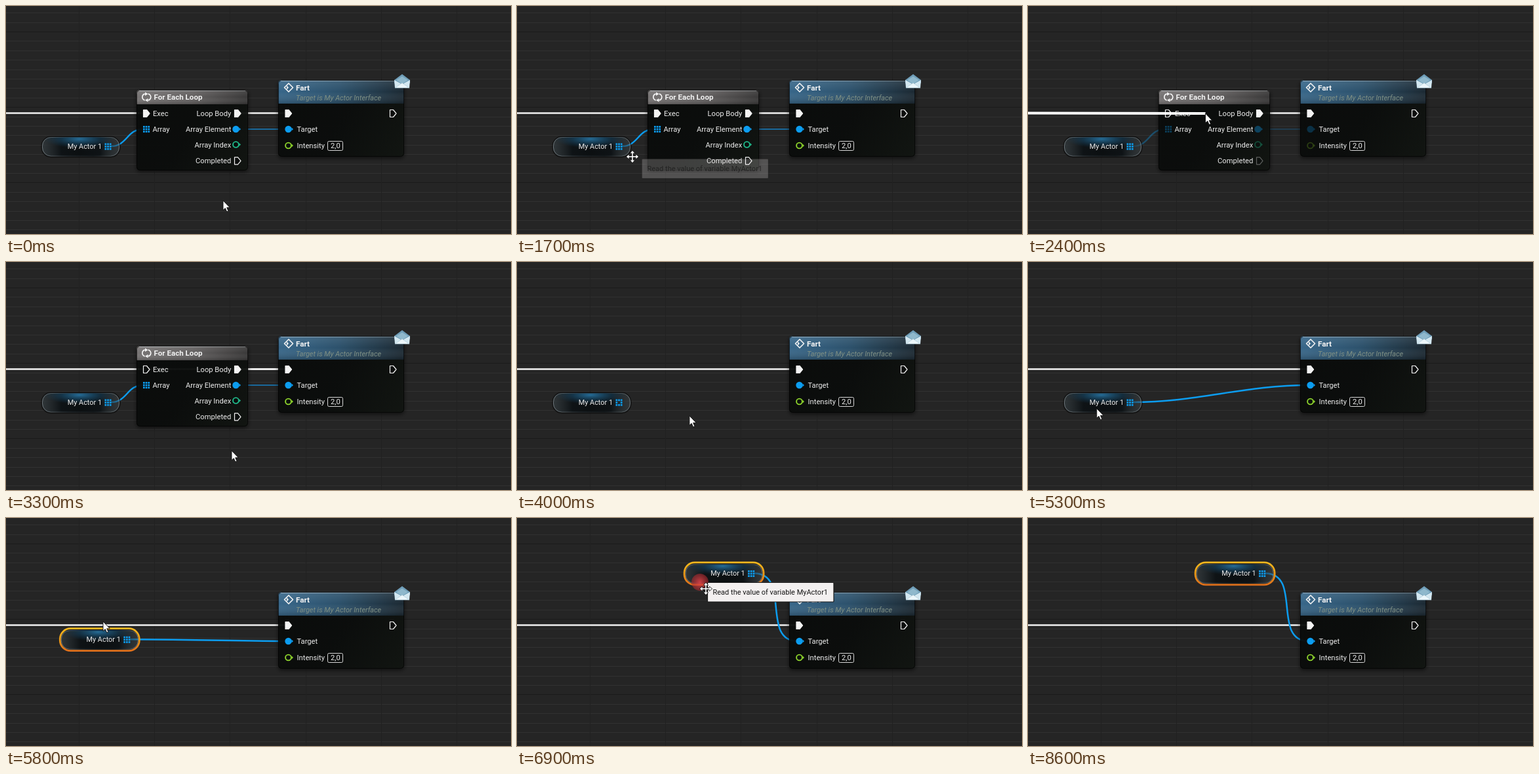
Recreate the animation shown at these times as an HTML page with a canvas. Size 770 px wide and 348 px high, loop 9.9 s.

```html
<!DOCTYPE html>
<html lang="en">
<head>
<meta charset="utf-8">
<title>Node graph</title>
<style>
html, body { margin: 0; width: 100%; height: 100%; overflow: hidden; background: #252525; }
canvas { display: block; }
</style>
</head>
<body>
<canvas id="stage" width="770" height="348"></canvas>
<script>
const ctx = document.getElementById('stage').getContext('2d');
const W = 770, H = 348, LOOP = 9900, GRID = 14.4;
const BLUE = '#0c9df0', GREEN = '#8ed42c', TEAL = '#1fb98a', WHITE = '#f4f4f4';
const TIP = 'Read the value of variable MyActor1';

// Each key: [time, x, y]
const CURSOR = [
  [0, 331, 297], [1000, 176, 230], [1900, 176, 230], [2200, 214, 164], [2800, 432, 164],
  [3300, 344, 288], [3600, 300, 242], [3900, 300, 242], [4200, 157, 214], [4600, 452, 182],
  [4800, 452, 182], [5400, 77, 227], [5800, 148, 158], [6500, 279, 98], [6800, 279, 98],
  [6900, 288, 108], [7200, 288, 108], [7700, 369, 132], [8300, 369, 132], [8600, 433, 360]
];
const VARIABLE = [[5500, 0, 0], [5800, 2, -2], [6500, 14, -9]];

function sample(keys, t, ease = p => p) {
  if (t <= keys[0][0]) return keys[0].slice(1);
  for (let i = 1; i < keys.length; i++) {
    const [t0, x0, y0] = keys[i - 1], [t1, x1, y1] = keys[i];
    if (t <= t1) {
      const p = ease((t - t0) / (t1 - t0));
      return [x0 + (x1 - x0) * p, y0 + (y1 - y0) * p];
    }
  }
  return keys[keys.length - 1].slice(1);
}

const smooth = p => p * p * (3 - 2 * p);
const within = (t, a, b) => t >= a && t < b;

function gradient(x0, y0, x1, y1, ...colors) {
  const g = ctx.createLinearGradient(x0, y0, x1, y1);
  colors.forEach((c, i) => g.addColorStop(i / (colors.length - 1), c));
  return g;
}

function glow(x, y, r, inner, outer) {
  const g = ctx.createRadialGradient(x, y, 0, x, y, r);
  g.addColorStop(0, inner);
  g.addColorStop(1, outer);
  return g;
}

function box(x, y, w, h, r, fill, stroke, width = 1) {
  ctx.beginPath();
  ctx.roundRect(x, y, w, h, r);
  paint(fill, stroke, width);
}

function paint(fill, stroke, width = 1) {
  if (fill) { ctx.fillStyle = fill; ctx.fill(); }
  if (stroke) { ctx.strokeStyle = stroke; ctx.lineWidth = width; ctx.stroke(); }
}

function shape(points, fill, stroke, width) {
  ctx.beginPath();
  points.forEach(([x, y]) => ctx.lineTo(x, y));
  ctx.closePath();
  paint(fill, stroke, width);
}

function text(s, x, y, { size = 11.2, style = '', color = '#ececec', align = 'left' } = {}) {
  ctx.font = `${style} ${size}px Roboto, sans-serif`;
  ctx.textAlign = align;
  ctx.fillStyle = color;
  ctx.fillText(s, x, y);
}

function faded(alpha, draw) {
  ctx.save();
  ctx.globalAlpha *= alpha;
  draw();
  ctx.restore();
}

function at(x, y, draw) {
  ctx.save();
  ctx.translate(x, y);
  draw();
  ctx.restore();
}

function wire(x0, y0, x1, y1, color, width) {
  const bend = (Math.abs(x1 - x0) + Math.abs(y1 - y0)) / 3;
  ctx.beginPath();
  ctx.moveTo(x0, y0);
  ctx.bezierCurveTo(x0 + bend, y0, x1 - bend, y1, x1, y1);
  paint(null, color, width);
}

// A wire held by the cursor stays visible only up to the pins of the call node.
function draggedWire(...args) {
  ctx.save();
  ctx.beginPath();
  ctx.rect(0, 0, 425, H);
  ctx.clip();
  wire(...args);
  ctx.restore();
}

function execPin(x, y, filled) {
  ctx.lineJoin = 'round';
  shape([[x - 4.5, y - 5.5], [x + 0.5, y - 5.5], [x + 5, y], [x + 0.5, y + 5.5], [x - 4.5, y + 5.5]],
    filled ? WHITE : '#0c0e0d', WHITE, 1.2);
}

function dataPin(x, y, color, filled) {
  shape([[x + 5, y - 2.5], [x + 7.5, y], [x + 5, y + 2.5]], color);
  ctx.beginPath();
  ctx.arc(x, y, filled ? 5.2 : 4.4, 0, 7);
  paint(filled ? color : '#0a0d0c', filled ? null : color, 1.9);
}

function arrayPin(x, y, linked) {
  ctx.fillStyle = BLUE;
  for (let i = 0; i < 9; i++) {
    if (linked || i !== 4) ctx.fillRect(x - 5 + i % 3 * 3.7, y - 5 + Math.floor(i / 3) * 3.7, 2.7, 2.7);
  }
}

function background() {
  ctx.fillStyle = '#252525';
  ctx.fillRect(0, 0, W, H);
  for (let i = -2; i < 23; i++) {
    ctx.fillStyle = i % 8 ? '#313131' : '#1b1b1b';
    ctx.fillRect(0, Math.round(39 + i * GRID), W, 1);
  }
  ctx.fillStyle = '#212121';
  for (let x = 111; x < W; x += 8 * GRID) ctx.fillRect(Math.round(x), 0, 1, H);
}

function nodeFrame(x, y, w, h, headerHeight, header) {
  ctx.save();
  ctx.shadowColor = 'rgba(0,0,0,.7)';
  ctx.shadowBlur = 6;
  ctx.shadowOffsetY = 2;
  box(x, y, w, h, 5, gradient(x, y, x + w, y + h, 'rgba(10,12,11,.9)', 'rgba(11,13,12,.9)', 'rgba(18,22,18,.9)'));
  ctx.restore();
  box(x, y, w, headerHeight, [5, 5, 0, 0], header);
  box(x, y, w, headerHeight, [5, 5, 0, 0],
    gradient(0, y, 0, y + headerHeight, 'rgba(255,255,255,.1)', 'rgba(255,255,255,0)', 'rgba(0,0,0,.2)'));
  ctx.fillStyle = gradient(x, 0, x + w, 0, 'rgba(230,240,245,.5)', 'rgba(230,240,245,.3)');
  ctx.fillRect(x + 4, y + 1, w - 8, 1);
  box(x + .5, y + .5, w - 1, h - 1, 5, null, 'rgba(0,0,0,.65)');
}

function selection(x, y, w, h, r) {
  box(x, y, w, h, r, null, gradient(0, y, 0, y + h, '#f5b81f', '#e99a18', '#e0701c'), 2.8);
}

function loopIcon() {
  for (const side of [-1, 1]) {
    ctx.beginPath();
    ctx.arc(214.3 + side * 1.5, 139, 5, side < 0 ? 1.8 : -1.4, side < 0 ? 4.5 : 1.4);
    paint(null, WHITE, 1.7);
  }
  shape([[212, 131.5], [216.5, 134.3], [212, 137]], WHITE);
  shape([[216.5, 141], [212, 143.7], [216.5, 146.5]], WHITE);
}

function loopNode(execLinked, dim, selected) {
  nodeFrame(199, 128, 170, 123, 22, gradient(199, 128, 369, 150, '#777474', '#636060', '#383737'));
  loopIcon();
  text('For Each Loop', 225.5, 143, { size: 11.6, style: 'bold', color: '#f1f1f1' });
  execPin(214, 164, execLinked);
  text('Exec', 224, 168);
  execPin(353, 164, true);
  faded(dim, () => {
    arrayPin(214, 188, true);
    dataPin(350.5, 188, BLUE, true);
    dataPin(350.5, 211.5, TEAL, false);
    execPin(353, 236.3, false);
  });
  text('Array', 223.5, 192);
  ['Loop Body', 'Array Element', 'Array Index', 'Completed'].forEach((label, i) =>
    text(label, 343.3, 168 + Math.floor(i * 24), { align: 'right' }));
  if (selected) selection(197.5, 126.5, 173, 126, 6);
}

function envelope() {
  shape([[592, 113], [604, 104], [616, 113], [616, 118], [592, 118]], '#6f9db8');
  shape([[595, 113], [604, 107.5], [613, 113], [604, 119]], '#8fb8cc');
  shape([[592, 113], [604, 119.5], [616, 113], [615, 125], [593, 125]], '#d4e8f1');
  shape([[593, 125], [604, 117.5], [615, 125]], '#ecf6fa', '#a9c9d8', .6);
}

function callNode(execDim, dataDim, hovered) {
  nodeFrame(415, 113, 192, 117, 36, gradient(415, 118, 600, 152, '#38678a', '#2c516b', '#1c2a34'));
  shape([[431, 118], [437.5, 124.5], [431, 131], [424.5, 124.5]], null, WHITE, 1.6);
  shape([[428, 121.5], [431, 124.5], [428, 127.5]], WHITE);
  text('Fart', 442, 128.5, { size: 11.7, style: 'bold', color: '#f4f4f4' });
  text('Target is My Actor Interface', 442, 143.5, { size: 10.9, style: 'italic', color: '#7f9085' });
  faded(execDim, () => {
    execPin(430.5, 164, true);
    execPin(590, 164, false);
  });
  if (hovered) box(425, 180, 55, 16, 2, gradient(425, 0, 480, 0, '#07618f', '#0a4e72', '#0b2e42'));
  faded(hovered || execDim < 1 ? 1 : dataDim, () => dataPin(430.5, 188, BLUE, !hovered));
  text('Target', 443.5, 192);
  faded(dataDim, () => dataPin(430.5, 213, GREEN, false));
  text('Intensity', 443.5, 217);
  box(490.5, 206.5, 23, 14, 2, '#0b0d0c', '#d8d8d8');
  text('2,0', 495, 217.3);
  envelope();
}

function variableNode(x, y, linked, selected) {
  at(x, y, () => {
    box(54.5, 199.5, 119, 31, 14, null, 'rgba(0,0,0,.5)', 2);
    box(55, 200, 118, 29.5, 13,
      gradient(55, 0, 173, 0, 'rgba(52,60,64,.75)', 'rgba(12,17,20,.9)', 'rgba(9,13,15,.9)', 'rgba(12,17,20,.9)', 'rgba(62,72,77,.45)'));
    ctx.save();
    ctx.clip();
    ctx.translate(112, 203);
    ctx.scale(1, .26);
    ctx.fillStyle = glow(0, 0, 54, 'rgba(40,118,165,.9)', 'rgba(20,70,105,0)');
    ctx.fillRect(-60, -20, 120, 110);
    ctx.restore();
    box(55.5, 200.5, 117, 28.5, 13, null,
      gradient(55, 0, 173, 0, 'rgba(150,160,165,.6)', 'rgba(60,72,80,.5)', 'rgba(50,60,66,.3)', 'rgba(150,160,165,.6)'));
    arrayPin(155.5, 214.5, linked);
    text('My Actor 1', 93.7, 218, { size: 10.9 });
    if (selected) selection(53.5, 197.5, 121, 34, 16);
  });
}

function tooltip(x, y, boxAlpha, textAlpha) {
  faded(boxAlpha, () => box(x + .5, y + .5, 192.5, 29.5, 1, '#f3f0f0', '#1a1a1a', 1.2));
  faded(textAlpha, () => text(TIP, x + 8.5, y + 19, { size: 11, color: '#141414' }));
}

function arrow(x, y) {
  at(x, y, () => shape([[0, 0], [0, 14.5], [3.3, 11.6], [5.7, 17], [8, 16], [5.7, 10.7], [10.3, 10.7]],
    '#fff', '#111', .9));
}

function moveCursor(x, y) {
  at(x, y, () => {
    for (const [color, width] of [['#111', 3.6], ['#fff', 1.6]]) {
      for (let i = 0; i < 4; i++) {
        ctx.rotate(Math.PI / 2);
        ctx.beginPath();
        ctx.moveTo(0, 0);
        ctx.lineTo(0, -7);
        paint(null, color, width);
        shape([[0, -9], [3, -5.5], [-3, -5.5]], color, color, width > 2 ? 1.6 : .2);
      }
    }
  });
}

function acceptMark(x, y) {
  box(x - 10, y - 10, 20, 20, 3, 'rgba(22,24,22,.93)');
  ctx.beginPath();
  ctx.moveTo(x - 6, y + 1);
  ctx.lineTo(x - 2, y + 5);
  ctx.lineTo(x + 6, y - 5);
  paint(null, '#a3b84a', 2);
}

function render(t) {
  const [cx, cy] = sample(CURSOR, t, smooth);
  const [gx, gy] = sample(VARIABLE, t).map(Math.round);
  const dx = gx * GRID, dy = gy * GRID;
  const loopAlive = t < 3800;
  const execDrag = within(t, 2200, 2900);
  const dataDrag = within(t, 4200, 4700);
  const rerouted = t >= 2900;
  const overTarget = dataDrag && cx > 425;

  background();

  if (!execDrag) {
    wire(0, 163.5, rerouted ? 428 : 210, 163.5, dataDrag ? '#686868' : '#f2f2f2', dataDrag ? 1.6 : 2.4);
  }
  if (loopAlive) {
    wire(355, 163.5, 428, 163.5, '#f2f2f2', 2.4);
    faded(execDrag ? .35 : 1, () => {
      wire(160, 214, 209, 188, BLUE, 2.4);
      wire(355, 188, 428, 188, '#1681c4', 1.7);
    });
  } else if (t >= 4700) {
    wire(160 + dx, 214 + dy, 428, 188, BLUE, 2.5);
  }

  variableNode(dx, dy, loopAlive || t >= 4700, t >= 5400);
  if (loopAlive) loopNode(t < 2200, execDrag ? .35 : 1, t >= 3600);
  callNode(dataDrag ? .32 : 1, dataDrag || execDrag ? .25 : 1, overTarget);

  if (execDrag) draggedWire(0, 163.5, cx, cy, '#fff', 4);
  if (dataDrag) draggedWire(162, 214, cx, cy, '#8cc3fb', 4.8);
  if (overTarget) acceptMark(cx + 24, cy + 26);

  if (within(t, 1700, 2000)) t < 1800 ? tooltip(190, 233, .22, .65) : tooltip(190, 233, 1, 1);
  if (within(t, 6800, 7000)) {
    ctx.fillStyle = glow(279, 98, 13.5, 'rgba(235,70,75,.85)', 'rgba(170,40,45,.55)');
    ctx.beginPath();
    ctx.arc(279, 98, 13, 0, 7);
    ctx.fill();
  }
  if (within(t, 6700, 7300)) t < 6800 ? tooltip(290, 98, .22, .65) : tooltip(290, 98, 1, 1);

  if (t < 8600) {
    const overNode = within(t, 900, 2000) || within(t, 6600, 7300);
    (overNode ? moveCursor : arrow)(cx, cy);
  }
}

function frame() {
  render(Math.floor(performance.now() % LOOP / 100) * 100);
  requestAnimationFrame(frame);
}
frame();
</script>
</body>
</html>
```
